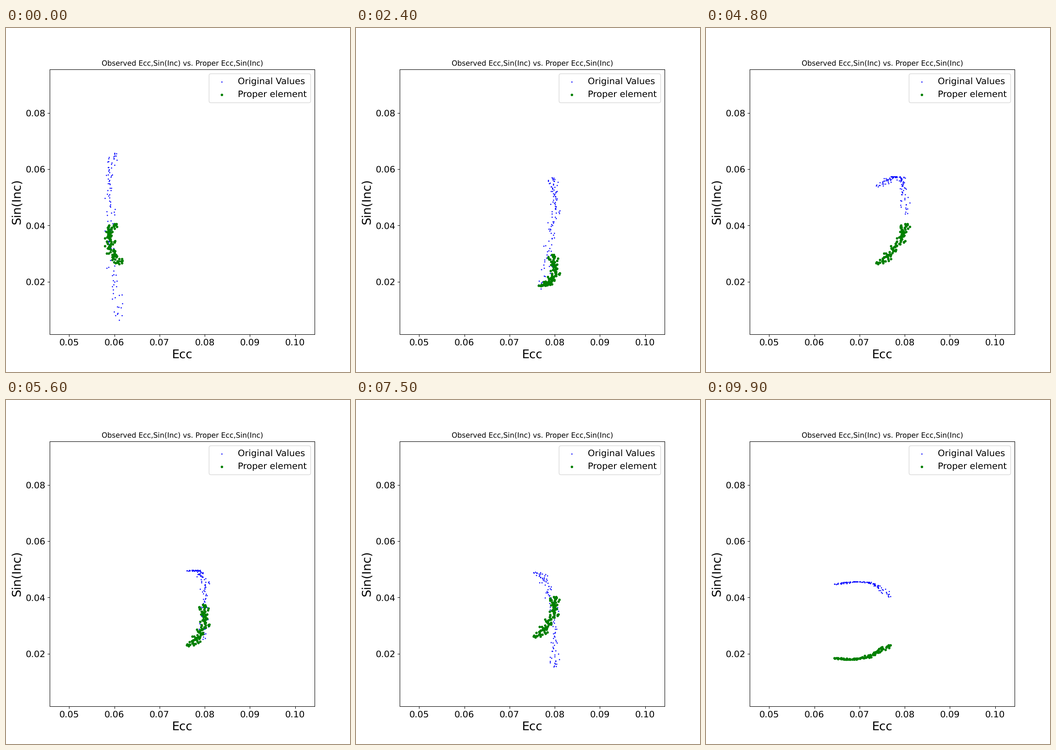
A matplotlib script that plays this animation: 748x748 px, repeating every 10000 ms.

```python
import numpy as np
import matplotlib.pyplot as plt
from matplotlib.animation import FuncAnimation

FRAMES = 100
COUNT = 104
CYCLE = 9  # frames per precession turn

plt.rcParams["text.hinting"] = "none"

rng = np.random.default_rng(11)
u = np.linspace(-1, 1, COUNT) + rng.normal(0, 0.02, COUNT)  # place along the family
spread = rng.normal(0, 0.0006, COUNT).clip(-0.0014, 0.0014)

# Key times and the angles there, in degrees: eccentricity, inclination, forced wave
TIMES = np.array([0, 15, 34, 48, 65, 85, 99])
ECC = [186, 30, 30, 30, 42, -3, 82]
INC = [13, 22, -70, 13, 20, 2, -72]
FORCED = [-5, -14, 117, 143, 246, 150, 112]


def angle(n, keys):
    """Phase at time n, with whole turns added between the key angles."""
    turns = np.round(TIMES / CYCLE)
    return np.radians(np.interp(n, TIMES, keys + 360 * turns))


def elements(n):
    ecc = 0.0694 + 0.0106 * np.cos(angle(n, ECC) - 0.575 * u) + spread
    proper_inc = 0.031 + 0.013 * np.sin(angle(n, INC) + 0.6 * u)
    wave = angle(n, FORCED) + 0.95 * u
    observed_inc = proper_inc + 0.0275 * np.sin(wave + 0.45 * np.cos(wave))
    return ecc, np.abs(observed_inc), proper_inc


fig, ax = plt.subplots(figsize=(8, 8), dpi=93.5)
ax.set_box_aspect(1)
ax.set_xlim(0.04571, 0.10436)
ax.set_ylim(0.00133, 0.09549)
ax.set_xticks(np.arange(5, 11) / 100)
ax.set_yticks(np.arange(2, 9, 2) / 100)
ax.tick_params(labelsize=15)
ax.set_xlabel("Ecc", fontsize=20)
ax.set_ylabel("Sin(Inc)", fontsize=20)
ax.set_title("Observed Ecc,Sin(Inc) vs. Proper Ecc,Sin(Inc)", fontsize=12)

observed = ax.scatter([], [], s=1, color="b", label="Original Values")
proper = ax.scatter([], [], s=10, color="g", label="Proper element")
ax.legend(loc="upper right", fontsize=15)


def update(n):
    ecc, observed_inc, proper_inc = elements(n)
    observed.set_offsets(np.column_stack([ecc, observed_inc]))
    proper.set_offsets(np.column_stack([ecc, proper_inc]))
    return observed, proper


anim = FuncAnimation(fig, update, frames=FRAMES, interval=100, repeat=True)
plt.show()
```
